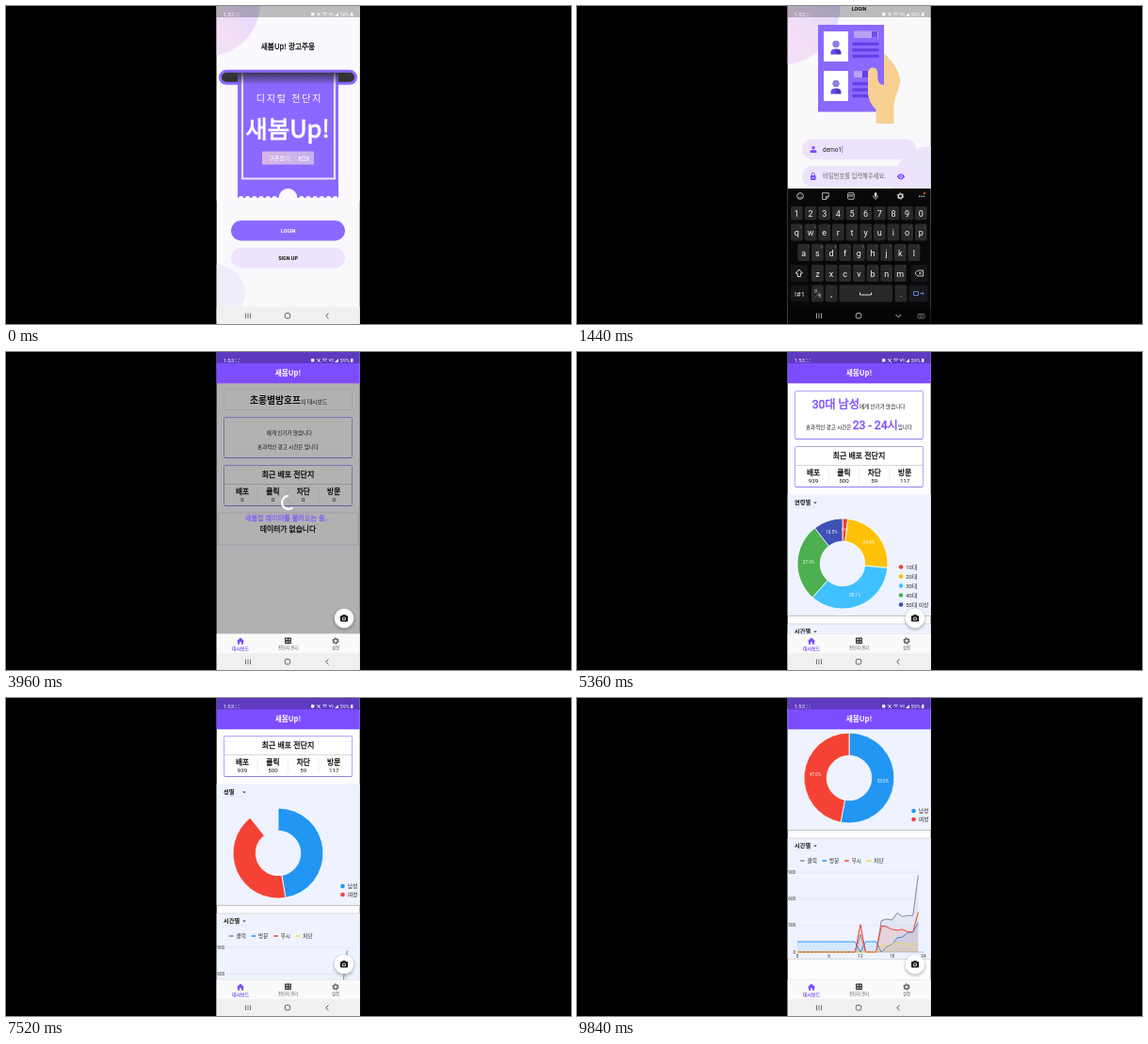
An HTML page that plays this animation: 600x338 px, repeating every 10000 ms.

```html
<!DOCTYPE html>
<html lang="ko">
<head>
<meta charset="utf-8">
<style>
html, body { margin: 0; width: 100%; height: 100%; overflow: hidden; background: #000; }
svg { display: block; }
text { font-family: Roboto, "Noto Sans CJK KR", "Noto Sans CJK", sans-serif; }
.brand { font-family: "Noto Sans CJK KR", "Noto Sans CJK", sans-serif; }
</style>
</head>
<body>
<svg id="stage" width="600" height="338" viewBox="0 0 600 338"></svg>
<script>
const PURPLE = '#8b68ff', DEEP = '#7c4dff', LILAC = '#ede3fc', PANEL = '#eef3ff';
const BRAND = '새봄Up!', SHOP = '초롱별밤호프', EMAIL = 'demo1@ab.local', SECRET = 'hint9';

const rect = (x, y, w, h, fill, r = 0, more = '') =>
  `<rect x="${x}" y="${y}" width="${w}" height="${h}" fill="${fill}" rx="${r}" ${more}/>`;
const circle = (x, y, r, fill, more = '') => `<circle cx="${x}" cy="${y}" r="${r}" fill="${fill}" ${more}/>`;
const path = (d, fill, more = '') => `<path d="${d}" fill="${fill}" ${more}/>`;
const line = (d, color, w = 1, more = '') => path(d, 'none', `stroke="${color}" stroke-width="${w}" ${more}`);
const text = (x, y, size, str, fill = '#111', weight = 400, anchor = 'middle', more = '') =>
  `<text x="${x}" y="${y + size * .36}" font-size="${size}" fill="${fill}" font-weight="${weight}" text-anchor="${anchor}" ${more}>${str}</text>`;
// Medium weight: regular glyphs with a thin outline, as Hangul comes only in regular and bold.
const medium = (x, y, size, str, fill = '#111', more = '') =>
  text(x, y, size, str, fill, 400, 'middle', `stroke="${fill}" stroke-width="${size * .035}" ${more}`);
const group = (id, body, more = '') => `<g id="${id}" ${more}>${body}</g>`;
const small = str => `<tspan font-size="5.5" stroke="none" fill="#111">${str}</tspan>`;
const times = (n, f) => Array.from({ length: n }, (_, i) => f(i)).join('');

function navBar(bg, ink, typing) {
  return rect(223, 320, 153, 18, bg) +
    line('M254.5 326.5v5.5M257 326.5v5.5M259.5 326.5v5.5', ink, .8) +
    rect(296.3, 326.5, 5.4, 5.4, 'none', 1.6, `stroke="${ink}" stroke-width=".9"`) +
    (typing
      ? line('M338.5 328l2.8 2.8 2.8-2.8', ink) + rect(362, 327.5, 7, 4.5, 'none', .5, 'stroke="#888" stroke-width=".7"') +
        line('M363 329h5M364 330.7h3', '#888', .6)
      : line('M342.5 326.5l-2.8 2.8 2.8 2.8', ink));
}

function statusBar() {
  return rect(223, 0, 153, 12, '#000', 0, 'opacity=".25"') +
    '<g opacity=".9">' + text(230.5, 9, 6, '1:52', '#fff', 400, 'start', 'id="clock"') +
    line('M243.7 7.3l1 1M247.6 7.3l-1 1M243.7 11l1-1M247.6 11l-1-1', '#fff', .7) +
    rect(324, 7, 3.4, 3.6, '#fff', .8) + line('M330 7l4 4M331 10.5l2.5-3.5', '#fff', .9) +
    line('M336 8q2.5-2 5 0M337.2 9.4q1.3-1 2.6 0', '#fff', .8) +
    line('M343 7l1.3 3 1.3-3M347 7v3.5', '#fff', .7) +
    path('M349 11h4v-4z', '#fff') + text(359.7, 9, 5.6, '58%', '#fff', 400, 'middle', 'id="battery"') +
    rect(366, 7, 2.4, 4, '#fff', .4) + '</g>';
}

const button = (y, label, fill, ink) => rect(239, y, 121, 21.5, fill, 10.75) + text(299.5, y + 10.75, 5.4, label, ink, 700);

function landing() {
  const ticket = rect(246, 71, 107, 133, PURPLE) +
    line('M251 71V183.5H349V71', '#e9e2ff', 2.2) +
    rect(246, 71, 107, 13, 'url(#shade)') +
    times(15, i => circle(249.5 + i * 7.15, 204.7, 2.8, '#fbf9fd')) +
    circle(299.5, 204, 10, '#fbf9fd');
  return rect(223, 0, 153, 338, '#f9f9fb') + rect(223, 0, 153, 207, '#fbf9fd') +
    circle(214, -3, 56, 'url(#blob)') + circle(224, 305, 30, '#f0edfb') +
    medium(299.5, 43, 7.7, BRAND + ' 광고주용', '#111', 'class="brand"') +
    rect(227.5, 69.3, 144, 13, '#333', 6.5, `stroke="${PURPLE}" stroke-width="3"`) + ticket +
    text(301, 98, 10, '디지털 전단지', '#fff', 400, 'middle', 'letter-spacing="1.8"') +
    medium(299, 131, 25.5, BRAND, '#fff', 'class="brand"') +
    rect(272, 154.5, 55, 14, 'url(#coupon)') + text(290.5, 161.5, 6.2, '쿠폰받기', '#fff') +
    line('M311.5 164v-4l2.5 2 2.2-3 2.2 3 2.5-2v4z', '#fff', .8) +
    button(228, 'LOGIN', PURPLE, '#fff') + button(257, 'SIGN UP', LILAC, '#111');
}

function flyer() {
  const portrait = y => rect(262, y, 26, 32, '#fff') + circle(275, y + 13.5, 3.7, '#8f80e6') +
    path(`M269.5 ${y + 24.5}v-2q0-4 5.5-4v6z`, '#6947ea') + path(`M275 ${y + 18.5}q5.5 0 5.5 4v2h-5.5z`, '#4c37b5');
  const lines = (y, w) => times(3, i => rect(292.5, y + i * 6.5, w, 3.2, '#6240e6'));
  return rect(256, 20, 70, 92.5, PURPLE) + portrait(27) + portrait(69) +
    rect(294, 26.5, 26, 7.5, '#b7a2f8') + rect(313, 27, 6, 6.5, '#6c4ff0') + lines(38.7, 28) +
    rect(294, 69, 9, 7, '#b7a2f8') + rect(303, 69, 6, 7, '#6240e6') + lines(81, 17) +
    path('M326 50C334 58 342 67 343.5 80L336.5 104V125H317.5V110C311 104 309 97 309 90V70.5a5.1 5.1 0 0 1 10.2 0V76Q320 84 326 84z', '#f7d091');
}

function login() {
  const field = y => rect(239, y, 121, 21.5, LILAC, 10.75);
  const form = text(299.5, 3, 5.4, 'LOGIN', '#111', 700) + flyer() + field(141.5) + field(170.3) +
    circle(251, 150.6, 1.7, DEEP) + path('M247.6 156v-1.3q0-1.9 3.4-1.9t3.4 1.9v1.3z', DEEP) +
    rect(248, 180, 5.6, 5, DEEP, .7) + line('M249.3 180v-1.3a1.5 1.5 0 0 1 3 0v1.3', DEEP, .9) + circle(250.8, 182.5, .8, LILAC) +
    path('M339.6 181.2q4.4-6 8.8 0q-4.4 6-8.8 0z', DEEP) + circle(344, 181.2, 1.7, LILAC) + circle(344, 181.2, 1, DEEP) +
    text(261, 152.5, 6.5, '', '#222', 400, 'start', 'id="email"') +
    text(261, 181, 6.3, '', '#222', 400, 'start', 'id="secret"') +
    rect(0, 0, .6, 8, DEEP, 0, 'id="caret"') + button(206, 'LOGIN', PURPLE, '#fff');
  return rect(223, 0, 153, 338, '#f9f8fb') + circle(214, -3, 66, 'url(#blob)') + circle(376, 190, 41, '#eae5fb') + group('form', form);
}

const gear = (x, y, ink) => circle(x, y, 2.2, 'none', `stroke="${ink}" stroke-width="1.3"`) +
  circle(x, y, 3.2, 'none', `stroke="${ink}" stroke-width="1" stroke-dasharray="1.6 1.75"`);

function keyboard() {
  const ink = '#ddd', dark = '#151517';
  const cap = (x, y, w, h, label = '', size = 9, fill = '#292929') =>
    rect(x, y, w, h, fill, 1.8) + text(x + w / 2, y + h / 2 + .3, size, label, '#f2f2f2');
  const row = (keys, x, y, h, marks = '') => times(keys.length, i => {
    const left = x + i * 14.65;
    return cap(left, y, 12.8, h, keys[i]) + text(left + 10.8, y + 3, 3, marks[i] || '', '#8a8a8a');
  });
  const tools =
    circle(237, 202, 3.4, 'none', `stroke="${ink}" stroke-width=".8"`) + line('M235 203q2 2 4 0M235.5 201h.8M237.7 201h.8', ink, .7) +
    line('M260.7 198.7h6.6v4l-2.8 2.8h-3.8zM264.5 205v-2.6h2.8', ink, .8) +
    rect(287.6, 198.7, 6.6, 6.6, 'none', 1, `stroke="${ink}" stroke-width=".8"`) + text(290.9, 202, 3.4, 'GIF', ink, 700) +
    rect(315.8, 198.3, 2.6, 4.5, ink, 1.3) + line('M314.4 201.5q0 2.7 2.7 2.7t2.7-2.7M317.1 204v2', ink, .7);
  return rect(223, 194, 153, 144, '#08080a') + group('tools', tools) + gear(343.5, 202, ink) +
    times(3, i => circle(363.7 + i * 2.4, 202.2, .8, ink)) + circle(369, 199, 1.2, '#f0442e') +
    row('1234567890', 227, 213, 14.5) + row('qwertyuiop', 227, 231.5, 18, '+×÷=/_‹›[]') +
    row('asdfghjkl', 234.3, 253, 18, '!@#~%^*()') + row('zxcvbnm', 249, 275, 18, "-'\":;,?") +
    cap(227, 275, 18, 18, '', 9, dark) + line('M235.8 280l-3.6 4h2v3.6h3.2V284h2z', '#eee', .9) +
    cap(354.5, 275, 18, 18, '', 9, dark) + line('M359 284l2.6-3h6v6h-6zM363 282.6l2.8 2.8M365.8 282.6l-2.8 2.8', '#eee', .8) +
    cap(227, 296.5, 19, 18, '!#1', 7.5, dark) + cap(249, 296.5, 12.8, 18) +
    text(253.5, 303.5, 4, '한', '#eee') + line('M253 309.5l5-6', '#999', .5) + text(257.5, 308.5, 4, '영', '#eee') +
    cap(263.7, 296.5, 12.8, 18, ',') + cap(278.5, 296.5, 56.5, 18) + line('M300.5 304.5v2.5h12v-2.5', '#eee', .9) +
    cap(337.5, 296.5, 12.8, 18, '.') +
    group('next', cap(352.5, 296.5, 20, 18, '', 9, '#17191f') + line('M357.5 303.5h5v4h-5zM364 305.5h4M366.5 304l1.7 1.5-1.7 1.5', '#6c9be0', .8)) +
    group('done', cap(352.5, 296.5, 20, 18, '완료', 5.8, '#666')) + navBar('#050506', '#ccc', true);
}

const card = (y, h) => rect(231.5, y + .5, 136, h - 1, '#fff', 1.5, 'stroke="#a48ff3" stroke-width=".8"') +
  line(`M232 ${y + h - .5}h135`, '#8f78e0', .8);
function summary(y, counts) {
  return card(y, 44) + medium(299.5, y + 10, 8, '최근 배포 전단지') + line(`M232 ${y + 20.5}H367.5`, '#bbb', .6) +
    ['배포', '클릭', '차단', '방문'].map((name, i) => {
      const x = 251 + i * 32.4;
      return medium(x, y + 28.3, 7.7, name) + text(x, y + 36.3, 6.2, counts[i]) +
        (i ? line(`M${x - 16.2} ${y + 24}v16`, '#bbb', .5, 'stroke-dasharray="1"') : '');
    }).join('');
}
const heading = rect(231.5, 39.5, 136, 22, '#fdfdfd', 0, 'stroke="#ddd" stroke-width=".5"') +
  text(300, 51, 9.8, `${SHOP}<tspan font-size="5.8" font-weight="400">의 대시보드</tspan>`, '#111', 700);

function emptyBody() {
  return heading + card(69, 44) + text(301, 86, 5.5, '에게 인기가 많습니다') + text(299.5, 101, 5.5, '효과적인 광고 시간은 입니다') +
    summary(120, [0, 0, 0, 0]) + rect(225, 171, 149, 34, '#fdfdfd', 0, 'stroke="#cfc8e8" stroke-width=".6"') +
    rect(223, 33, 153, 267, '#000', 0, 'opacity=".3"') +
    medium(299, 176.5, 7.2, '새봄업 데이터를 불러오는 중...', '#8560f5') + medium(299.5, 188, 7.8, '데이터가 없습니다') +
    group('spinner', line('M300 153a7 7 0 1 0 4.5 12.4', '#fff', 2));
}

const chartX = h => 234 + h * 5.58, chartY = v => 438 - v * .0944;
// name, colour, morning level, noon peak, values from 16 h on
const series = [
  ['클릭', '#85889a', 0, 200, [355, 370, 360, 440, 400, 410, 410, 865]],
  ['방문', '#2196f3', 116, 0, [0, 60, 85, 160, 170, 220, 225, 330]],
  ['무시', '#f44336', 0, 310, [295, 285, 255, 245, 255, 230, 225, 450]],
  ['차단', '#fcd92b', 0, 0, [75, 75, 92, 95, 102, 85, 92, 92]],
];
const picker = (y, label, id = '') => text(231, y, 6.2, label, '#111', 700, 'start', id) +
  path(`M251.2 ${y - .6}h3.6l-1.8 1.9z`, '#333') + line(`M231 ${y + 5}H256`, '#d5d9e5', .5);

function chart() {
  const plot = series.map(([, color, base, noon, late], n) => {
    const d = 'M' + Array.from({ length: 24 }, (_, h) => [chartX(h), chartY(h == 12 ? noon : h < 16 ? base : late[h - 16])]).join('L');
    return path(d + 'V438H234z', color, 'opacity=".12"') + line(d, color, 1, n == 3 ? 'stroke-dasharray="2.5 1.5"' : '');
  }).join('');
  return rect(223, 317, 153, 128, PANEL) + line('M223 317H376M223 445.5H376', '#ccc', .7) + picker(325, '시간별') +
    series.map(([name, color], i) => line(`M${237 + i * 23.6} 341h4.6`, color, 1.4) + text(244.5 + i * 23.6, 341, 5.6, name, '#222', 400, 'start')).join('') +
    [0, 300, 600, 900].map(v => line(`M234 ${chartY(v)}H368`, v ? '#dde1ea' : '#999', .6) + text(232.2, chartY(v), 4.7, v, '#333', 400, 'end')).join('') +
    [0, 6, 12, 18, 24].map(h => text(chartX(h), 442.3, 4.7, h, '#333')).join('') +
    group('plot', plot, 'clip-path="url(#wipe)"');
}

function fullBody() {
  return heading + card(69, 52) + medium(299, 84, 12.2, '30대 남성' + small('에게 인기가 많습니다'), DEEP) +
    medium(299.5, 106, 12.2, small('효과적인 광고 시간은 ') + '23 - 24시' + small('입니다'), DEEP) +
    summary(128, [939, 500, 59, 117]) + rect(223, 179, 153, 129, PANEL) + line('M223 308.5H376', '#bbb', .9) +
    picker(188, '연령별', 'id="kind"') + group('pie', '') + chart();
}

function dashboard() {
  return rect(223, 0, 153, 338, '#fdfcff') + group('empty', emptyBody()) + group('full', fullBody()) +
    rect(223, 0, 153, 33.3, DEEP) + text(299.5, 22.5, 7.7, BRAND, '#fff', 700, 'middle', 'class="brand"') +
    rect(223, 299.5, 153, 21, '#fafafa') + line('M223 299.5H376', '#ddd', .5) +
    path('M244.8 307.4l4.2-3.8 4.2 3.8h-1.2v3.4h-2.1v-2.5h-1.8v2.5h-2.1v-3.4z', DEEP) + medium(249, 314.8, 4.9, '대시보드', DEEP) +
    rect(296, 303.6, 7, 6.6, '#444', .7) + line('M297.2 305.4h2M297.2 308.2h2M300.5 305.4h1.5M300.5 308.2h1.5', '#fff', .9) + text(299.5, 314.8, 4.3, '전단지 관리', '#555') +
    gear(350, 307, '#555') + text(350, 314.8, 4.4, '설정', '#555') +
    circle(359, 284.5, 11, '#000', 'opacity=".22" filter="url(#blur)"') + circle(359, 283, 10.3, '#fff') +
    rect(355, 280.3, 8, 6.3, '#111', .8) + rect(357.2, 279.3, 3.6, 2, '#111', .5) + circle(359, 283.4, 1.9, '#fff') + circle(359, 283.4, 1.1, '#111');
}

const at = (cx, cy, turn, r) => [cx + r * Math.sin(turn * 2 * Math.PI), cy - r * Math.cos(turn * 2 * Math.PI)];
const ages = { cx: 282, lx: 344, ly: 256.5, step: 10, label: '연령별', parts: [
  ['10대', 1.9, '#ea4335'], ['20대', 24.6, '#ffc107'], ['30대', 35.1, '#40c0ff'], ['40대', 27.9, '#4caf50'], ['50대 이상', 10.5, '#3f51b5']] };
const genders = { cx: 289, lx: 357.5, ly: 288, step: 9, label: '성별', parts: [['남성', 53, '#2196f3'], ['여성', 47, '#f44336']] };
function pie({ cx, lx, ly, step, parts }, p) {
  const cy = 253;
  let from = 0, labels = '';
  const slices = parts.map(([name, share, color], i) => {
    const a = from * p, b = (from += share / 100) * p, big = +(b - a > .5), [x, y] = at(cx, cy, (a + b) / 2, 36);
    if (p == 1) labels += text(x, y, share < 5 ? 3.5 : 4.6, share.toFixed(1) + '%', '#fff');
    return path(`M${at(cx, cy, a, 48)}A48 48 0 ${big} 1 ${at(cx, cy, b, 48)}L${at(cx, cy, b, 23.8)}A23.8 23.8 0 ${big} 0 ${at(cx, cy, a, 23.8)}z`, color, 'stroke="#fff" stroke-width=".8"') +
      circle(lx, ly + i * step, 2.3, color) + text(lx + 5.2, ly + i * step, 5.9, name, '#222', 400, 'start');
  });
  return slices.join('') + labels;
}

const $ = id => document.getElementById(id);
$('stage').innerHTML = `<defs>
  <linearGradient id="blob" x1=".3" y1=".9" x2=".9" y2=".4"><stop stop-color="#ebe0fb"/><stop offset=".45" stop-color="#f4dff5"/><stop offset="1" stop-color="#dfd9fd"/></linearGradient>
  <linearGradient id="coupon"><stop stop-color="#d9b3e4"/><stop offset="1" stop-color="#c4b4f0"/></linearGradient>
  <linearGradient id="shade" x2="0" y2="1"><stop stop-color="#222" stop-opacity=".75"/><stop offset="1" stop-color="#222" stop-opacity="0"/></linearGradient>
  <filter id="blur"><feGaussianBlur stdDeviation="1.5"/></filter>
  <clipPath id="wipe"><rect id="wipeBox" x="232" y="340" width="0" height="100"/></clipPath></defs>
  <svg x="223.7" width="152" height="338" viewBox="223.7 0 152 338">` +
  group('landing', landing()) + group('login', login()) + group('dash', dashboard()) +
  navBar('#f0f0f0', '#555') + group('keys', keyboard()) + statusBar() + '</svg>';

const clamp = v => Math.max(0, Math.min(1, v));
const ramp = (t, a, b) => clamp((t - a) / (b - a));
const ease = (t, a, b) => { const p = ramp(t, a, b); return p * p * (3 - 2 * p); };
const show = (id, on) => $(id).style.display = on ? '' : 'none';
const shift = (id, y) => $(id).setAttribute('transform', `translate(0 ${y})`);
const typed = (t, start, gap, max) => Math.max(0, Math.min(max, Math.floor((t - start) / gap) + 1));

function render(t) {
  const enter = ease(t, 400, 640), home = ease(t, 3680, 3800);
  const up = ease(t, 760, 960) - ease(t, 3540, 3680), onSecret = t >= 2480;
  show('landing', enter < 1);
  show('login', enter > 0 && home < 1);
  show('dash', home > 0);
  $('login').setAttribute('opacity', enter);
  $('dash').setAttribute('opacity', home);
  shift('login', 30 * (1 - enter));
  shift('form', 40 * (1 - up) - 5 * ease(t, 2480, 2600));
  show('keys', up > 0);
  shift('keys', 144 * (1 - up));
  show('next', !onSecret);
  show('done', onSecret);
  $('tools').setAttribute('opacity', onSecret ? .35 : 1);
  $('clock').textContent = t < 640 ? '1:52' : '1:53';
  $('battery').textContent = home ? '59%' : '58%';

  const letters = typed(t, 1120, 80, 5) + typed(t, 1640, 90, EMAIL.length - 5), dots = typed(t, 2760, 170, SECRET.length);
  $('email').textContent = EMAIL.slice(0, letters);
  $('secret').textContent = dots ? '•'.repeat(dots - 1) + SECRET[dots - 1] : '비밀번호를 입력해주세요.';
  $('secret').setAttribute('fill', dots ? '#222' : '#666');
  const width = onSecret ? (dots ? $('secret').getComputedTextLength() : 0) : $('email').getComputedTextLength();
  $('caret').setAttribute('x', 261.3 + width);
  $('caret').setAttribute('y', onSecret ? 177 : 148.3);
  show('caret', up > .5);

  const loaded = t >= 4400, byGender = t >= 6880;
  show('empty', !loaded);
  show('full', loaded);
  $('spinner').setAttribute('transform', `rotate(${(t - 3960) * .5} 300 160)`);
  if (loaded) {
    const set = byGender ? genders : ages;
    shift('full', -28 * ease(t, 5080, 5360) - 60 * ease(t, 5480, 6000) - 80 * ease(t, 7900, 8700));
    $('kind').textContent = set.label;
    $('pie').innerHTML = pie(set, byGender ? ramp(t, 6880, 7597) : ramp(t, 4400, 5100));
    $('wipeBox').setAttribute('width', 144 * ramp(t, 4400, 5100));
  }
}

const begin = performance.now();
(function frame() {
  render((performance.now() - begin) % 10000);
  requestAnimationFrame(frame);
})();
</script>
</body>
</html>
```
